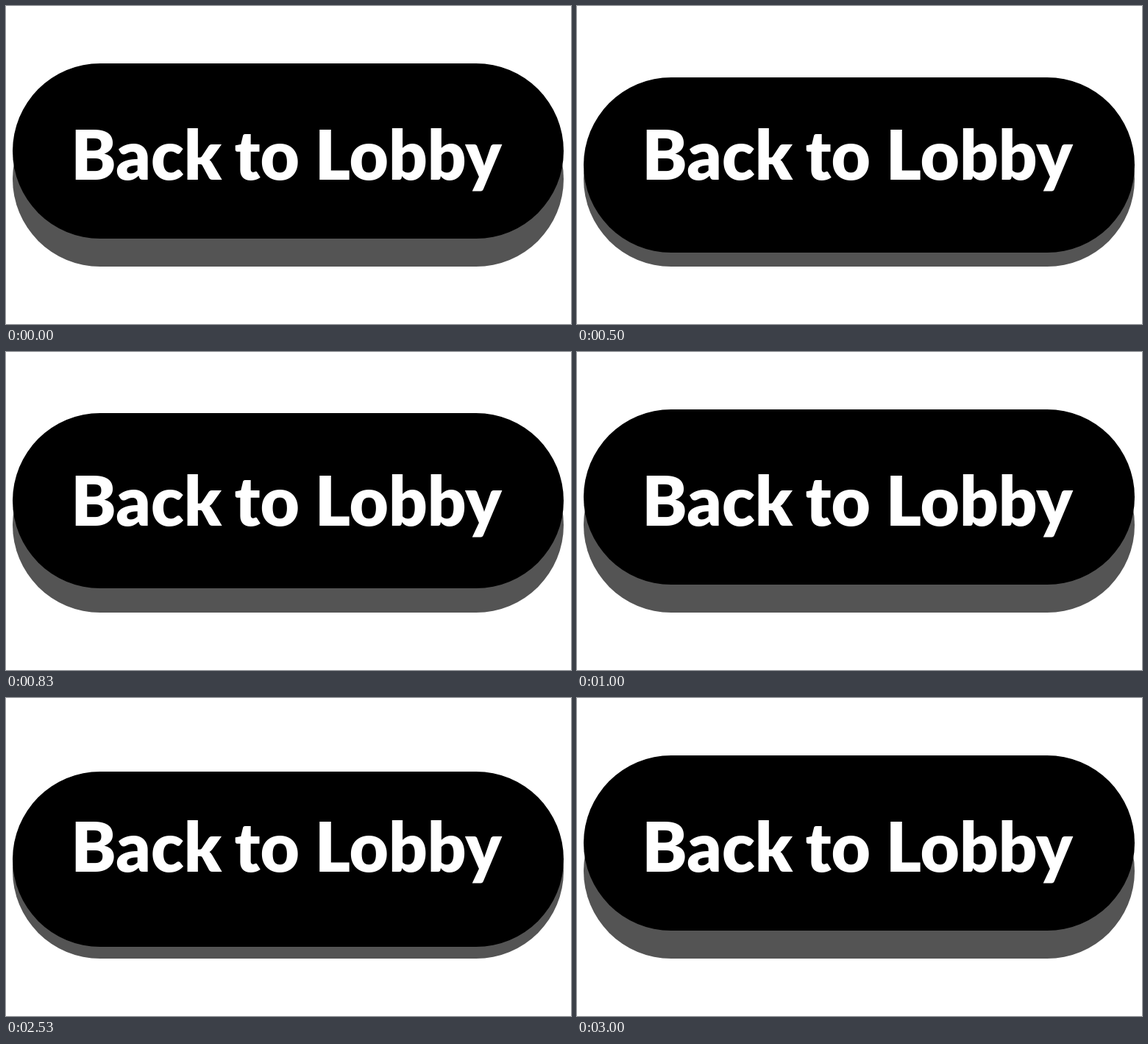
An HTML page with a canvas for the animation above (3070 ms loop, 768 px wide and 432 px high).

```html
<!DOCTYPE html>
<html lang="en">
<head>
<meta charset="utf-8">
<title>Back to Lobby</title>
<style>
  html, body { margin: 0; width: 100%; height: 100%; overflow: hidden; background: #fff; }
  canvas { display: block; }
</style>
</head>
<body>
<canvas id="stage" width="768" height="432"></canvas>
<script>
const ctx = document.getElementById('stage').getContext('2d');
const LOOP = 3070, FIRST_PRESS = 400, PRESS_GAP = 2000;
const DEPTH = 23, REST_Y = 78, BASE_Y = 116;
const PILL = { x: 9, w: 749, h: 238 };
const WORDS = [['Back', 194], ['to', 354.5], ['Lobby', 550.5]];
const BASELINE = 236;

function pill(y, color) {
  ctx.fillStyle = color;
  ctx.beginPath();
  ctx.roundRect(PILL.x, y, PILL.w, PILL.h, PILL.h / 2);
  ctx.fill();
}

// Centre the visible ink of a word on x.
function word(text, x) {
  const m = ctx.measureText(text);
  ctx.fillText(text, x + (m.actualBoundingBoxLeft - m.actualBoundingBoxRight) / 2, BASELINE);
}

// Poses change in alternating holds of 30 and 70 ms.
function poseAt(t) {
  if (t < FIRST_PRESS) return 0;
  const u = (t - FIRST_PRESS) % PRESS_GAP;
  return 1 + 2 * Math.floor(u / 100) + (u % 100 >= 30 ? 1 : 0);
}

// Sine ease-out down, then sine ease-in-out back up.
function pressDepth(pose) {
  if (pose <= 5) return DEPTH * Math.sin(Math.PI / 2 * pose / 5);
  const p = Math.min(1, (pose - 5.5) / 6.5);
  return DEPTH * (1 + Math.cos(Math.PI * p)) / 2;
}

function draw(t) {
  ctx.fillStyle = '#fff';
  ctx.fillRect(0, 0, 768, 432);
  pill(BASE_Y, '#545454');
  pill(REST_Y + Math.round(pressDepth(poseAt(t))), '#000');
  ctx.fillStyle = '#fff';
  ctx.font = '900 92px Lato, sans-serif';
  for (const [text, x] of WORDS) word(text, x);
}

let start = performance.now();
function tick() {
  draw((performance.now() - start) % LOOP);
  requestAnimationFrame(tick);
}
tick();
</script>
</body>
</html>
```
